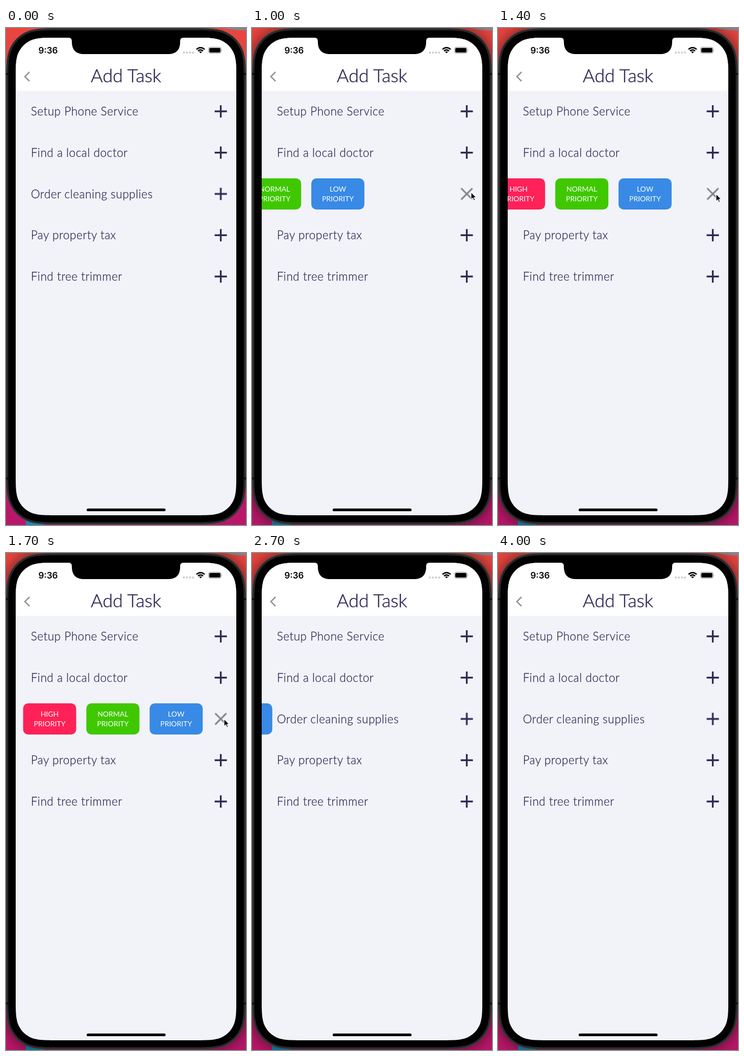
Write an HTML page that moves like this. It is 470 px wide and 972 px high and loops after 4100 ms.

```html
<!DOCTYPE html>
<html lang="en">
<head>
<meta charset="utf-8">
<title>Add Task</title>
<style>
  html, body { margin: 0; width: 100%; height: 100%; overflow: hidden; background: #000; }
  svg { display: block; width: 470px; height: 972px; }
  text { font-family: Lato, "Open Sans", sans-serif; fill: #2d2955; }
  .time { font: 600 17px Inter, Roboto, sans-serif; fill: #000; }
  .title, .task { font-weight: 300; stroke: #2d2955; }
  .title { font-size: 36px; text-anchor: middle; stroke-width: .5px; }
  .task { font-size: 22.5px; letter-spacing: .55px; stroke-width: .3px; }
  .pill text { font-size: 14px; fill: #fff; text-anchor: middle; }
  .plus { stroke: #2d2955; stroke-width: 3.4; }
  .cross { stroke: #808085; stroke-width: 3.2; }

  .pills, .swap-text, .swap-plus, .swap-cross, .cursor, .shadow { animation: 4.1s linear infinite; }
  .pills { animation-name: slide; }
  .swap-text { animation-name: fade; }
  .swap-plus { animation-name: plus; }
  .swap-cross { animation-name: cross; }
  .cursor { animation-name: point; }
  .shadow { animation-name: shade; animation-timing-function: step-end; }

  @keyframes slide {
    0% { transform: translateX(-432px); }
    11.73% { transform: translateX(-432px); animation-timing-function: cubic-bezier(.333, .667, .667, 1); }
    46.46% { transform: none; }
    56.05% { transform: none; animation-timing-function: cubic-bezier(.333, 0, .667, .333); }
    66.9%, 100% { transform: translateX(-432px); }
  }
  @keyframes fade {
    0%, 11.73% { opacity: 1; }
    16.5%, 56.05% { opacity: 0; }
    58.4%, 100% { opacity: 1; }
  }
  @keyframes plus {
    0%, 11.73% { transform: rotate(0deg) scale(1); }
    16.6%, 56.05% { transform: rotate(60deg) scale(0); }
    61%, 100% { transform: rotate(0deg) scale(1); }
  }
  @keyframes cross {
    0%, 11.73% { transform: rotate(-75deg) scale(0); }
    16.6%, 56.05% { transform: rotate(45deg) scale(1); }
    61%, 100% { transform: rotate(-75deg) scale(0); }
  }
  @keyframes point {
    0%, 3% { transform: translate(482px, 300px); }
    10.5%, 25.6% { transform: translate(429px, 321px); }
    30.5%, 59% { transform: translate(427px, 324.5px); }
    63.4%, 100% { transform: translate(482px, 332px); }
  }
  @keyframes shade {
    0% { opacity: 0; }
    2.44%, 100% { opacity: 1; }
  }
</style>
</head>
<body>
<svg viewBox="0 0 470 972">
  <defs>
    <linearGradient id="wall" x2="0" y2="1">
      <stop offset="0" stop-color="#e8463f"/>
      <stop offset=".5" stop-color="#d02a50"/>
      <stop offset="1" stop-color="#b8176a"/>
    </linearGradient>
    <filter id="blur" x="-20%" y="-20%" width="140%" height="140%">
      <feGaussianBlur stdDeviation="14"/>
    </filter>
    <clipPath id="screen"><path id="glass"/></clipPath>
    <path id="bars" d="M-12 0H12M0 -12V12"/>
  </defs>

  <rect width="470" height="972" fill="url(#wall)"/>
  <path d="M39 960H75V972H39Z" fill="#1d86b4"/>
  <path d="M425 0H470V5Q445 5 425 0Z" fill="#8d8288"/>

  <g class="shadow"><path id="shadow" fill-opacity=".6" filter="url(#blur)"/></g>
  <path id="frame" fill="#29292b" stroke="#47474a"/>
  <path d="M0 90H4M466 90H470M0 881H4M466 881H470" stroke="#111" stroke-width="4"/>
  <path id="bezel"/>

  <g clip-path="url(#screen)">
    <rect x="19" y="19" width="432" height="934" fill="#f2f3f9"/>
    <rect x="19" y="19" width="432" height="104" fill="#fff"/>
    <text class="title" x="235" y="106">Add Task</text>
    <path d="M46 86L37 95L46 104" fill="none" stroke="#929296" stroke-width="2.6"/>
    <g id="tasks"></g>
    <g class="pills" id="pills"></g>
    <rect x="158" y="939.7" width="154.5" height="5.3" rx="2.6"/>
  </g>

  <path d="M122 18V19C127 19 129 21 129 27C129 43 137 51 153 51H317C333 51 341 43 341 27C341 21 343 19 348 19V18Z"/>
  <text class="time" x="63.5" y="50">9:36</text>
  <g fill="#c9c9cb">
    <circle cx="348.3" cy="48" r="1.9"/><circle cx="354.3" cy="48" r="1.9"/>
    <circle cx="360.3" cy="48" r="1.9"/><circle cx="366.3" cy="48" r="1.9"/>
  </g>
  <g fill="none" stroke="#000" stroke-width="2.6">
    <path d="M373 41.8Q381 34.8 389 41.8"/>
    <path d="M376 45Q381 40.8 386 45"/>
  </g>
  <path d="M378.2 46.7Q381 44.7 383.8 46.7L381 49.6Z"/>
  <rect x="396.5" y="37.5" width="25" height="12" rx="3.6" fill="none" stroke="#8e8e90"/>
  <rect x="398" y="39" width="22" height="9" rx="2.2"/>
  <path d="M422.8 41.7Q424.6 43.5 422.8 45.3Z" fill="#8e8e90"/>

  <path class="cursor" d="M0 0V14.5L3.4 11.4L5.6 16.6L8 15.6L5.8 10.5H10.3Z"
        stroke="#fff" stroke-width="1.2" stroke-linejoin="round"/>
</svg>
<script>
  const tasks = ["Setup Phone Service", "Find a local doctor", "Order cleaning supplies",
                 "Pay property tax", "Find tree trimmer"];
  const pills = [["HIGH", "#ff2158"], ["NORMAL", "#3fc800"], ["LOW", "#388ae6"]];
  const openRow = 2;
  const $ = id => document.getElementById(id);

  // Rectangle with continuous-curvature corners; the curve runs from a side edge to a flat edge.
  const curve = [[0, 1.53], [0, 1.09], [0, .87], [.075, .63], [.17, .37],
                 [.37, .17], [.63, .075], [.87, 0], [1.09, 0], [1.53, 0]];
  function smoothRect(x, y, w, h, r) {
    const corner = (right, bottom) => {
      const pts = curve.map(([a, b]) =>
        [right ? x + w - a * r : x + a * r, bottom ? y + h - b * r : y + b * r]);
      if (right !== bottom) pts.reverse();
      return pts[0] + "C" + pts.slice(1).join(" ");
    };
    return "M" + [corner(0, 0), corner(1, 0), corner(1, 1), corner(0, 1)].join("L") + "Z";
  }

  $("glass").setAttribute("d", smoothRect(19, 19, 432, 934, 52.4));
  $("bezel").setAttribute("d", smoothRect(4.5, 4.5, 461, 962, 66));
  for (const id of ["frame", "shadow"])
    $(id).setAttribute("d", smoothRect(.5, .5, 469, 970, 70));

  $("tasks").innerHTML = tasks.map((name, i) => {
    const y = 163 + i * 80.75;
    const swap = kind => i === openRow ? "swap-" + kind : "";
    const cross = i === openRow
      ? '<g class="swap-cross"><path class="cross" d="M-15.5 0H15.5M0 -15.5V15.5"/></g>' : "";
    return `<text class="task ${swap("text")}" x="48.7" y="${y + 8}">${name}</text>
      <g transform="translate(420.6 ${y})">${cross}
        <g class="${swap("plus")}"><use href="#bars" class="plus"/></g>
      </g>`;
  }).join("");

  $("pills").innerHTML = pills.map(([level, color], i) =>
    `<g class="pill" transform="translate(${42.3 + i * 123.9} 294)">
      <rect width="104" height="61" rx="10" fill="${color}"/>
      <text x="52" y="26">${level}</text>
      <text x="52" y="45">PRIORITY</text>
    </g>`).join("");
</script>
</body>
</html>
```
